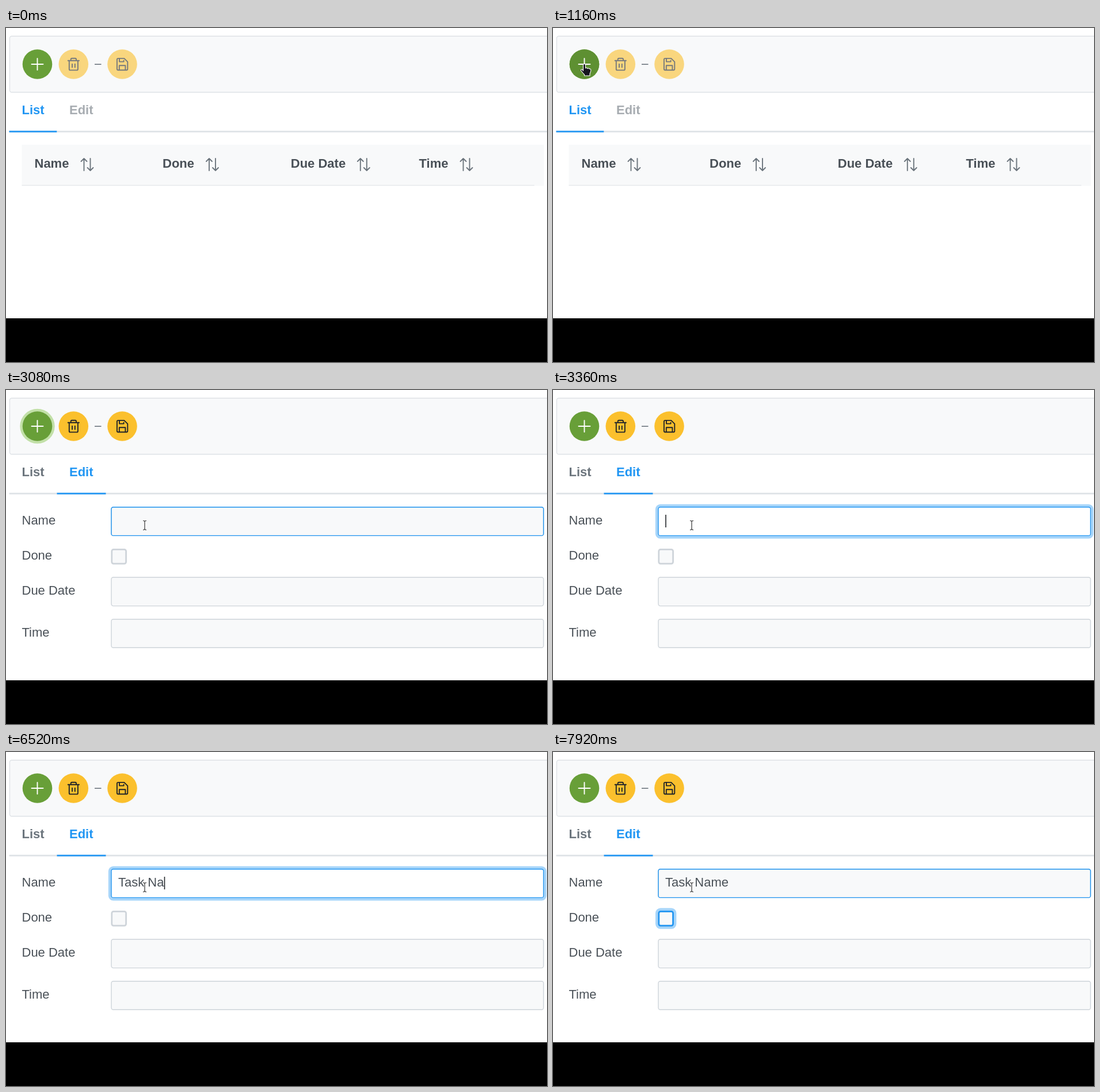
Recreate the animation shown at these times as an HTML page. Size 940 by 581 pixels, loop 8 s.

```html
<!DOCTYPE html>
<html lang="en">
<head>
<meta charset="utf-8">
<title>Task form</title>
<style>
  html, body { margin: 0; width: 100%; height: 100%; overflow: hidden; background: #fff; }
  svg { display: block; width: 940px; height: 581px; font: 22px "Liberation Sans", Arial, sans-serif; }
  text { fill: #495057; white-space: pre; }
  .bold { font-weight: bold; }
  .line { fill: none; stroke-width: 1.9; stroke-linecap: round; stroke-linejoin: round; }
  .field { fill: #f8f9fa; stroke: #ced4da; stroke-width: 1.4; }
  .ring { fill: none; stroke: #a6d5fa; }
</style>
</head>
<body>
<svg viewBox="0 0 940 581">
  <defs>
    <path id="sort" class="line" stroke="#6c757d" d="M1 6L6 1L11 6M6 1V22M12 17L17 22L22 17M17 22V1"/>
  </defs>
  <rect width="940" height="581" fill="#fff"/>
  <rect x="6.4" y="14.3" width="960" height="97.4" rx="3.5" fill="#f8f9fa" stroke="#dee2e6" stroke-width="1.4"/>

  <circle id="addRing" cx="54.5" cy="63" fill="#c2e0a8"/>
  <circle cx="54.5" cy="63" r="25.8" fill="#689f38"/>
  <circle id="addHover" cx="54.5" cy="63" r="25.8" fill="#5e9032"/>
  <path class="line" stroke="#fff" d="M44.5 63H64.5M54.5 53V73"/>
  <g id="tools">
    <circle cx="117.3" cy="63" r="25.8" fill="#fbc02d"/>
    <circle cx="202" cy="63" r="25.8" fill="#fbc02d"/>
    <path class="line" stroke="#212529" d="M107.7 56.7H127M112.7 56.7V54.5Q112.7 52.7 114.5 52.7H120.2Q122 52.7 122 54.5V56.7M109.8 56.7V71.5Q109.8 73.4 111.7 73.4H123Q124.9 73.4 124.9 71.5V56.7M115 62.8V68.4M119.8 62.8V68.4"/>
    <path class="line" stroke="#212529" d="M195 52.9H205.3L211.3 58.9V71.2Q211.3 73.3 209.2 73.3H195Q192.9 73.3 192.9 71.2V55Q192.9 52.9 195 52.9ZM197 53V58.6H204.6V56.5M196.8 73V65.3H207.4V73"/>
  </g>
  <path d="M154 63.2H165.5" stroke="#6c757d" stroke-width="1.6"/>

  <path d="M5.5 180H940" stroke="#dee2e6" stroke-width="2.75"/>
  <path id="ink" stroke="#2196f3" stroke-width="2.75"/>
  <text id="listTab" class="bold" x="27.5" y="150">List</text>
  <text id="editTab" class="bold" x="110" y="150">Edit</text>

  <g id="list" class="bold">
    <rect x="27.5" y="203" width="907" height="71.5" fill="#f8f9fa"/>
    <path d="M27.5 273.6H918" stroke="#e4e7ea" stroke-width="1.4"/>
    <text x="49.5" y="243">Name</text><use href="#sort" x="129.5" y="226"/>
    <text x="272" y="243">Done</text><use href="#sort" x="347" y="226"/>
    <text x="494.8" y="243">Due Date</text><use href="#sort" x="609.8" y="226"/>
    <text x="717.5" y="243">Time</text><use href="#sort" x="788.5" y="226"/>
  </g>

  <g id="form">
    <text x="27.5" y="233.5">Name</text>
    <text x="27.5" y="294.5">Done</text>
    <text x="27.5" y="355.5">Due Date</text>
    <text x="27.5" y="428.5">Time</text>
    <rect id="nameRing" class="ring" x="183" y="203.8" width="751" height="49.6" rx="3.5"/>
    <rect class="field" x="183" y="203.8" width="751" height="49.6" rx="3.5"/>
    <rect id="nameFill" x="183" y="203.8" width="751" height="49.6" rx="3.5" fill="#fff"/>
    <rect id="nameHover" x="183" y="203.8" width="751" height="49.6" rx="3.5" fill="none" stroke="#2196f3" stroke-width="1.4"/>
    <text id="typed" x="195" y="233.5"></text>
    <path id="caret" stroke="#212529" stroke-width="1.6"/>
    <rect id="boxRing" class="ring" x="183.8" y="277.3" width="24.8" height="24.8" rx="3"/>
    <rect x="183.8" y="277.3" width="24.8" height="24.8" rx="3" fill="#f8f9fa" stroke="#ced4da" stroke-width="2.75"/>
    <rect id="boxFocus" x="183.8" y="277.3" width="24.8" height="24.8" rx="3" fill="none" stroke="#2196f3" stroke-width="2.75"/>
    <rect class="field" x="183" y="325.8" width="751" height="49.8" rx="3.5"/>
    <rect class="field" x="183" y="398.7" width="751" height="49.5" rx="3.5"/>
  </g>

  <rect y="505" width="940" height="76"/>

  <g id="cursor">
    <path id="arrow" d="M0 0V18L4.2 14.2L7 20.6L10 19.3L7.2 13H13Z" fill="#111" stroke="#fff" stroke-width="1.3"/>
    <path id="hand" d="M-2 2a2 2 0 0 1 4 0V7.2C3 6.4 5 6.6 5.4 8C6.5 7 8.4 7.4 8.8 8.8C10.2 8.2 11.5 9 11.3 11C11.2 14 10.5 15 9.5 17V20.5H0V18.5C-1.5 17 -4 14 -6 11.5C-6.6 10 -4.5 9 -3.4 10L-2 11.5Z" fill="#15151f" stroke="#fff" stroke-width="1.1"/>
    <g id="beam" class="line">
      <path d="M-2.5 -8Q0 -8 0 -6Q0 -8 2.5 -8M0 -6V6M-2.5 8Q0 8 0 6Q0 8 2.5 8" stroke="#fff" style="stroke-width:3"/>
      <path d="M-2.5 -8Q0 -8 0 -6Q0 -8 2.5 -8M0 -6V6M-2.5 8Q0 8 0 6Q0 8 2.5 8" stroke="#444" style="stroke-width:1.3"/>
    </g>
  </g>
</svg>
<script>
const LOOP = 8000, STEP = 40, FADE = 200;
const ENTER = 480, PRESS = 1920, SWITCH = 1960, LEAVE = 2560, FOCUS = 3160, BLUR = 7720;
const TEXT = "Task Name";
const KEYS = [4760, 5000, 5240, 5400, 5560, 6320, 6520, 6760, 6920];

const $ = id => document.getElementById(id);
const show = (id, on) => $(id).setAttribute("visibility", on ? "inherit" : "hidden");
const alpha = (id, a) => $(id).setAttribute("opacity", a);
const ramp = (t, start, length = FADE) => Math.min(1, Math.max(0, (t - start) / length));
const smooth = p => p * p * (3 - 2 * p);
const pulse = (t, on, off) => smooth(ramp(t, on)) - smooth(ramp(t, off));
const bezier = (a, b, c, s) => a * (1 - s) ** 2 + 2 * b * s * (1 - s) + c * s * s;

function pointer(t) {
  if (t < 1160) {
    const s = 1 - (1 - ramp(t, ENTER, 520)) ** 2;
    return [bezier(133, 110, 54, s), bezier(-12, 95, 69, s)];
  }
  if (t < LEAVE) return [54.5, 62.5];
  const u = ramp(t, LEAVE, 440);
  const s = u < 0.5 ? 2 * u * u : 1 - 2 * (1 - u) ** 2;
  return [56 + 185 * s, 64 + 171.3 * s];
}

function drawCursor(t) {
  const [x, y] = pointer(t);
  const onAdd = Math.hypot(x - 54.5, y - 63) < 26;
  const onTab = y > 113 && y < 181 && x < 173;
  const beam = x > 182 && y > 203, hand = onAdd || onTab;
  show("cursor", t >= ENTER);
  show("beam", beam);
  show("hand", hand);
  show("arrow", !beam && !hand);
  $("cursor").setAttribute("transform", `translate(${x} ${y})`);
}

function drawRing(id, p, border) {
  $(id).setAttribute("stroke-width", 8.8 * p + border);
  alpha(id, p);
}

function drawTyping(t) {
  const typed = $("typed");
  const count = KEYS.filter(k => t >= k).length;
  typed.textContent = TEXT.slice(0, count);
  const x = 196 + (count ? typed.getComputedTextLength() : 0);
  $("caret").setAttribute("d", `M${x} 217V239`);
  show("caret", t >= FOCUS && t < BLUR && (t < 4360 || t >= KEYS[0]));
}

function draw(t) {
  const editing = t >= SWITCH;
  show("list", !editing);
  show("form", editing);
  alpha("tools", editing ? 1 : 0.6);
  $("ink").setAttribute("d", editing ? "M88.5 180H173.5" : "M5.5 180H88.3");
  $("listTab").style.fill = editing ? "#6c757d" : "#2196f3";
  $("editTab").style.fill = editing ? "#2196f3" : "#a7acb1";

  const addFocus = pulse(t, PRESS, FOCUS);
  $("addRing").setAttribute("r", 25.8 + 4.4 * addFocus);
  alpha("addRing", addFocus);
  alpha("addHover", pulse(t, 790, 2660));

  const nameFocus = pulse(t, FOCUS, BLUR), boxFocus = smooth(ramp(t, BLUR));
  drawRing("nameRing", nameFocus, 1.4);
  alpha("nameFill", nameFocus);
  alpha("nameHover", smooth(ramp(t, 2870)));
  drawRing("boxRing", boxFocus, 2.75);
  alpha("boxFocus", boxFocus);

  drawTyping(t);
  drawCursor(t);
}

function frame(now) {
  draw(Math.floor(now % LOOP / STEP) * STEP);
  requestAnimationFrame(frame);
}
frame(performance.now());
</script>
</body>
</html>
```
